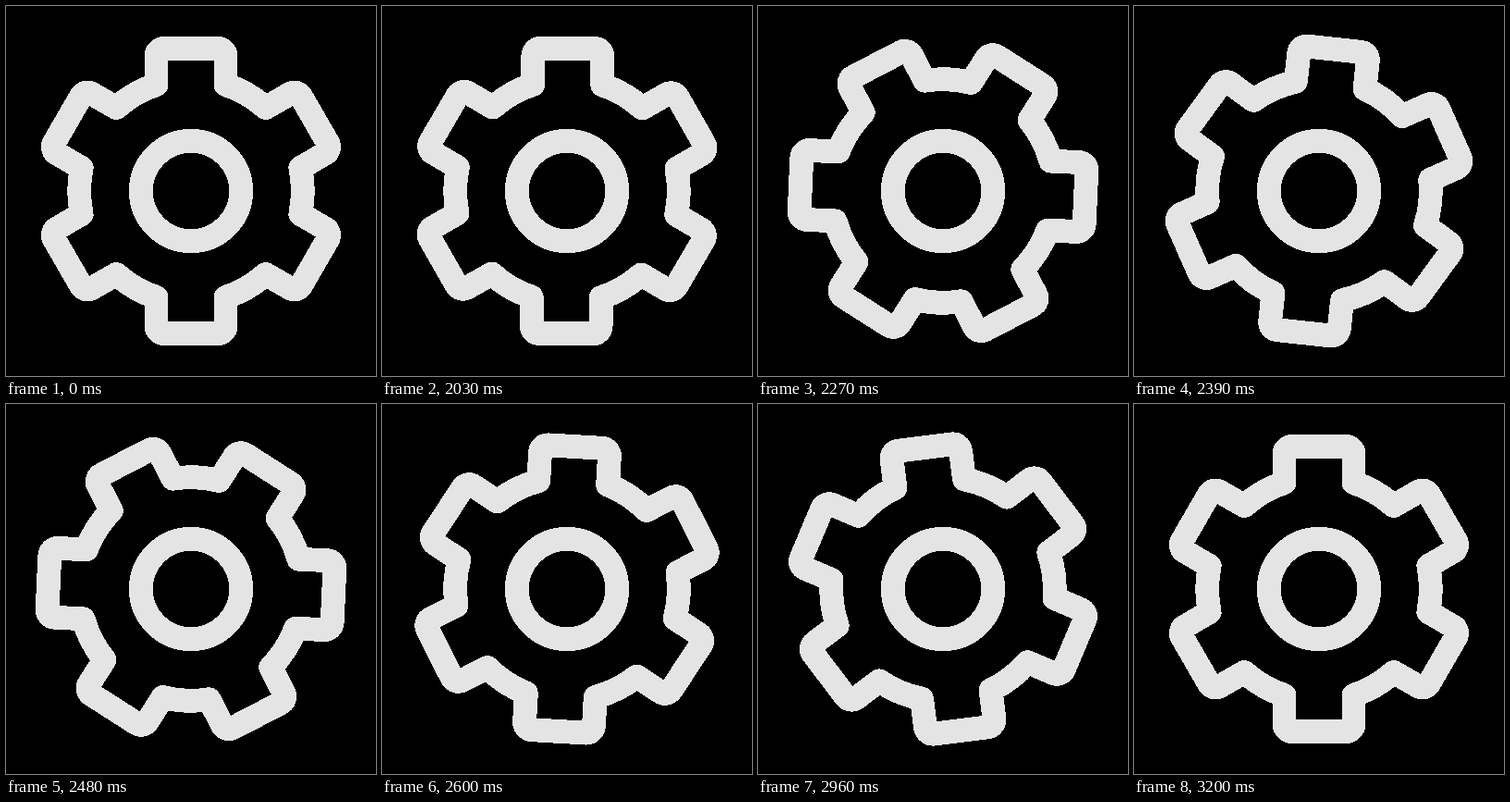
Animation, 400 px wide and 400 px high, one loop 3.26 s. Source, as an HTML page:

```html
<!DOCTYPE html>
<html lang="en">
<head>
<meta charset="utf-8">
<title>Gear</title>
<style>
  html, body { margin: 0; width: 100%; height: 100%; overflow: hidden; background: #000; }
  svg { display: block; width: 100%; height: 100%; }
</style>
</head>
<body>
<svg viewBox="-200 -200 400 400" fill="none" stroke="#e4e4e4" stroke-width="25.8" stroke-linejoin="round" shape-rendering="crispEdges">
  <path id="gear"/>
  <circle r="54.17"/>
</svg>
<script>
const LOOP = 3260, START = 2000, SPIN = 1200, STEP = 30, TURN = 180;
const HALF = 37.5, TIP = 154.17, ROOT = 120.83, FILLET = 8.33;
const gear = document.getElementById('gear');

function gearPath() {
  const foot = Math.sqrt(ROOT * ROOT - HALF * HALF);
  let d = '';
  for (let i = 0; i < 6; i++) {
    const c = Math.cos(i * Math.PI / 3), s = Math.sin(i * Math.PI / 3);
    const at = (x, y) => (x * c - y * s).toFixed(2) + ' ' + (x * s + y * c).toFixed(2);
    const arc = (r, x, y) => `A${r} ${r} 0 0 1 ${at(x, y)}`;
    d += (i ? `A${ROOT} ${ROOT} 0 0 1 ` : 'M') + at(-HALF, -foot)
      + 'L' + at(-HALF, FILLET - TIP) + arc(FILLET, FILLET - HALF, -TIP)
      + 'L' + at(HALF - FILLET, -TIP) + arc(FILLET, HALF, FILLET - TIP)
      + 'L' + at(HALF, -foot);
  }
  return d + `A${ROOT} ${ROOT} 0 0 1 ${-HALF} ${-foot.toFixed(2)}Z`;
}

// Cubic easing with handles (x1, 0) and (x2, 1)
function ease(x, x1 = 0.333, x2 = 0.38) {
  if (x <= 0) return 0;
  if (x >= 1) return 1;
  let lo = 0, hi = 1, s = x;
  for (let i = 0; i < 30; i++) {
    s = (lo + hi) / 2;
    const v = 1 - s;
    if (3 * x1 * s * v * v + 3 * x2 * s * s * v + s * s * s < x) lo = s;
    else hi = s;
  }
  return s * s * (3 - 2 * s);
}

function draw(ms) {
  const t = Math.floor((ms % LOOP - START) / STEP) * STEP;
  gear.setAttribute('transform', `rotate(${(TURN * ease(t / SPIN)).toFixed(3)})`);
}

function tick() {
  draw(performance.now() - begin);
  requestAnimationFrame(tick);
}

gear.setAttribute('d', gearPath());
const begin = performance.now();
tick();
</script>
</body>
</html>
```
